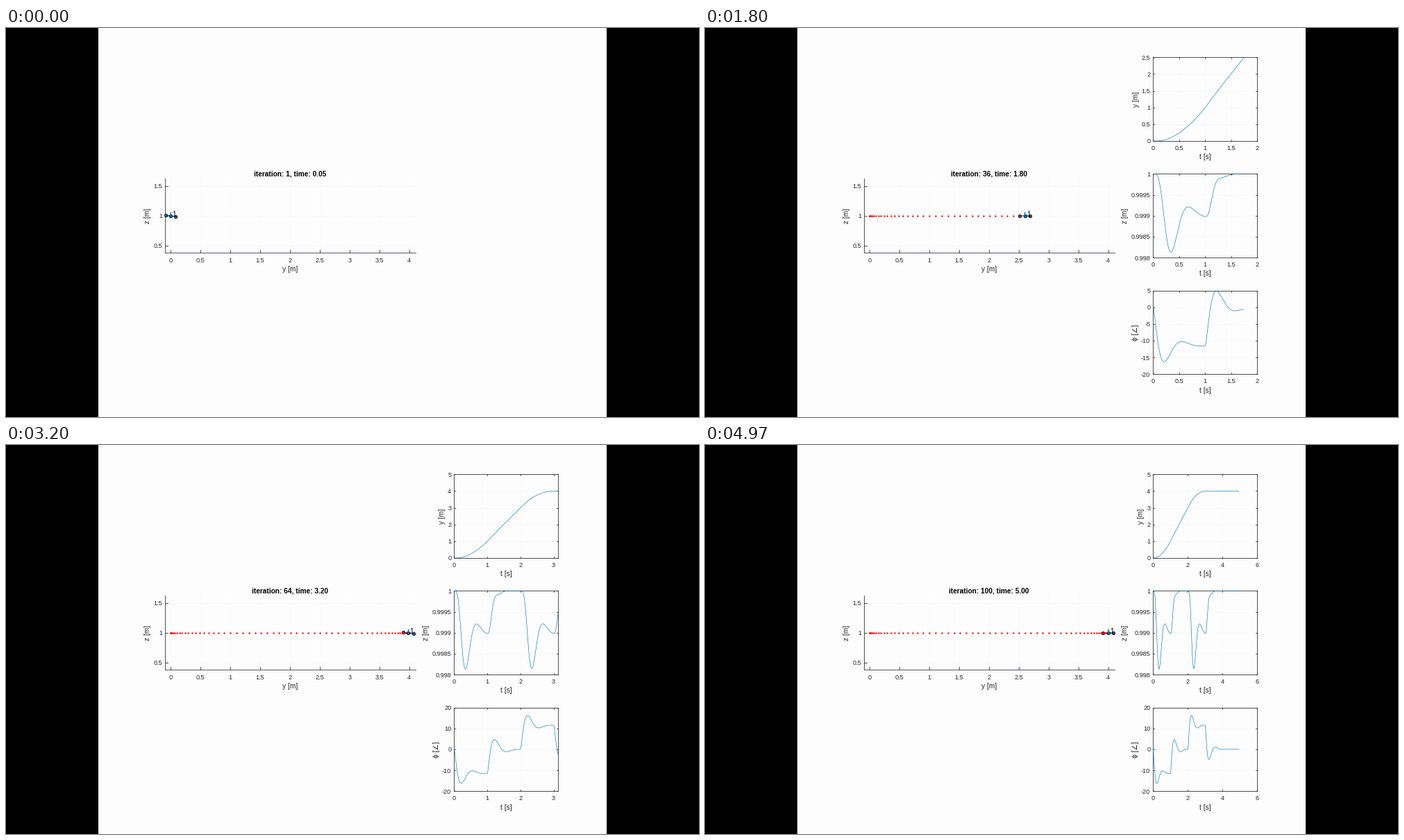
Recreate the animation shown at these times as a matplotlib script. Size 998 by 561 pixels, loop 5 s.

```python
import math
import matplotlib.pyplot as plt
import numpy as np
from matplotlib.animation import FuncAnimation
from matplotlib.patches import Rectangle

W, H, DPI = 998, 561, 100
FRAMES, LOOP = 250, 5000
PX = 72 / DPI
INK, GRID, BLUE = "#262626", "#f8f8fb", "#0072bd"
TICK, LABEL = 9.16, 10.1

plt.rcParams["font.family"] = ["Liberation Sans", "DejaVu Sans"]
fig = plt.figure(figsize=(W / DPI, H / DPI), dpi=DPI, facecolor="black")
ax = fig.add_axes([0, 0, 1, 1])
ax.set(xlim=(0, W), ylim=(H, 0))
ax.axis("off")
ax.autoscale(False)
ax.add_patch(Rectangle((133, 0), 732, H, fc="#fdfdfd", ec="none", zorder=0))


def desired(t):
    """Position, speed and acceleration: speed up, coast, slow down."""
    if t < 1:
        return t * t, 2 * t, 2
    if t < 2:
        return 2 * t - 1, 2, 0
    if t < 3:
        u = t - 2
        return 3 + 2 * u - u * u, 2 - 2 * u, -2
    return 4, 0, 0


def simulate(end=5.0, dt=0.001, keep=10):
    """Planar quadrotor under PD control; rows of y, z, phi every 10 ms."""
    g = 9.81
    y = vy = vz = phi = rate = 0.0
    z = 1.0
    rows = []
    for k in range(round(end / dt) + 1):
        if k % keep == 0:
            rows.append((y, min(z, 1), phi))
        py, pv, pa = desired(k / 1000)
        thrust = g + 200 * (1 - z) - 20 * vz
        goal = -(pa + 8.4 * (pv - vy) + 17 * (py - y)) / g
        rate += dt * (800 * (goal - phi) - 64 * rate)
        vy -= dt * thrust * math.sin(phi)
        vz += dt * (thrust * math.cos(phi) - g)
        phi += dt * rate
        y += dt * vy
        z += dt * vz
    return np.array(rows).T


Y, Z, PHI = simulate()
T = np.arange(len(Y)) * 0.01
live = []


def line(x, y, color=INK, width=0.8, z=3, **kw):
    art, = ax.plot(x, y, color=color, lw=width * PX, zorder=z, **kw)
    live.append(art)


def text(x, y, s, size=TICK, ha="center", va="baseline", **kw):
    kw = {"color": INK, "zorder": 6, **kw}
    live.append(ax.text(x, y, s, fontsize=size * PX, ha=ha, va=va, **kw))


def side_label(x, y, s):
    text(x, y, s, LABEL, va="center", rotation=90)


def label(v):
    return f"{round(v, 9) + 0:.6g}"


def label_width(s):
    narrow = {".": 0.278, "-": 0.333}
    return TICK * sum(narrow.get(c, 0.556) for c in s)


def ticks(lo, hi, most):
    """Finest 1-2-5 steps that cover lo..hi in at most the given intervals."""
    for power in range(-6, 3):
        for m in (1, 2, 5):
            step = m * 10.0 ** power
            a = math.floor(lo / step + 1e-9)
            b = math.ceil(hi / step - 1e-9)
            if a < b <= a + most:
                return [step * i for i in range(a, b + 1)]


def chart(top, name, t, data):
    left, right, bottom = 645.3, 795.3, top + 120.7
    xs, ys = ticks(0, t[-1], 4), ticks(data.min(), data.max(), 5)
    xmax = xs[-1] if t[-1] / xs[-1] >= 0.8 else t[-1]
    px = lambda v: left + (right - left) * v / xmax
    py = lambda v: bottom - (bottom - top) * (v - ys[0]) / (ys[-1] - ys[0])
    for v in xs:
        if v > xmax + 1e-9:
            continue
        x = px(v)
        line([x, x], [top, bottom], GRID, z=1)
        line([x, x], [bottom, bottom - 2])
        line([x, x], [top, top + 2])
        text(x, bottom + 13.2, label(v))
    for v in ys:
        y = py(v)
        line([left, right], [y, y], GRID, z=1)
        line([left, left + 2], [y, y])
        line([right, right - 2], [y, y])
        text(641.3, y + 3.4, label(v), ha="right")
    line([left, right, right, left, left], [top, top, bottom, bottom, top])
    line(px(t), py(data), BLUE, 0.6, 4)
    text(720.3, bottom + 26.2, "t [s]", LABEL)
    wide = max(label_width(label(v)) for v in ys)
    side_label(641.3 - wide - 7.8, (top + bottom) / 2, name)


def map_x(y):
    return 236.9 + 85.95 * y


def map_y(z):
    return 270.9 - 86 * (z - 1)


def scene(step):
    top, bottom, left, right = 217, 324, 229, 590
    for v in np.arange(0, 4.1, 0.5):
        x = map_x(v)
        line([x, x], [top, bottom], GRID, z=1)
        line([x, x], [bottom, bottom - 4])
        text(x, 337.5, label(v))
    for v in (0.5, 1, 1.5):
        y = map_y(v)
        line([left, right], [y, y], GRID, z=1)
        line([left, left + 4], [y, y])
        text(225, y + 3.4, label(v), ha="right")
    line([left, left], [top, bottom])
    line([left, right], [bottom, bottom], "#33304a")
    text(409.2, 350.6, "y [m]", LABEL)
    side_label(203.7, 270.5, "z [m]")
    text(409.2, 213.8, f"iteration: {step}, time: {step * 0.05:.2f}",
         10.15, weight="bold", color="black")

    # quadrotor and its trail
    now = step * 5
    phi = PHI[now]
    cx, cy = map_x(Y[now]), map_y(Z[now])
    dx, dy = 7.4 * math.cos(phi), -7.4 * math.sin(phi)
    ball = dict(marker="o", ms=4.4 * PX, mfc=BLUE, mec="black", mew=0.8 * PX)
    line([cx - dx, cx + dx], [cy - dy, cy + dy], "black", 0.8, 3, **ball)
    line(map_x(Y[:now + 1:5]), map_y(Z[:now + 1:5]), "red", 0, 4,
         ls="none", marker="o", ms=2.4 * PX, mew=0)
    line([cx], [cy], "black", 0.8, 5, **ball)
    line([cx, cx - 4.5 * math.sin(phi)], [cy, cy - 4.5 * math.cos(phi)],
         BLUE, 1.5, 5)
    text(cx + 5, 271.6, "1", LABEL, color="black")


def draw(frame):
    while live:
        live.pop().remove()
    # 20 steps a second, shown on a 30 Hz clock
    ms = (frame + 0.75) * LOOP / FRAMES
    tick = math.floor(ms * 0.03)
    step = max(1, math.ceil(tick * 2 / 3))
    scene(step)
    n = (step - 1) * 5
    if n:
        chart(42.3, "y [m]", T[:n], Y[:n])
        chart(210.4, "z [m]", T[:n], Z[:n])
        chart(378.6, "\u03d5 [\u2220]", T[:n], np.degrees(PHI[:n]))
    return live


anim = FuncAnimation(fig, draw, frames=FRAMES, interval=LOOP / FRAMES,
                     repeat=True, repeat_delay=0, blit=False)
plt.show()
```
